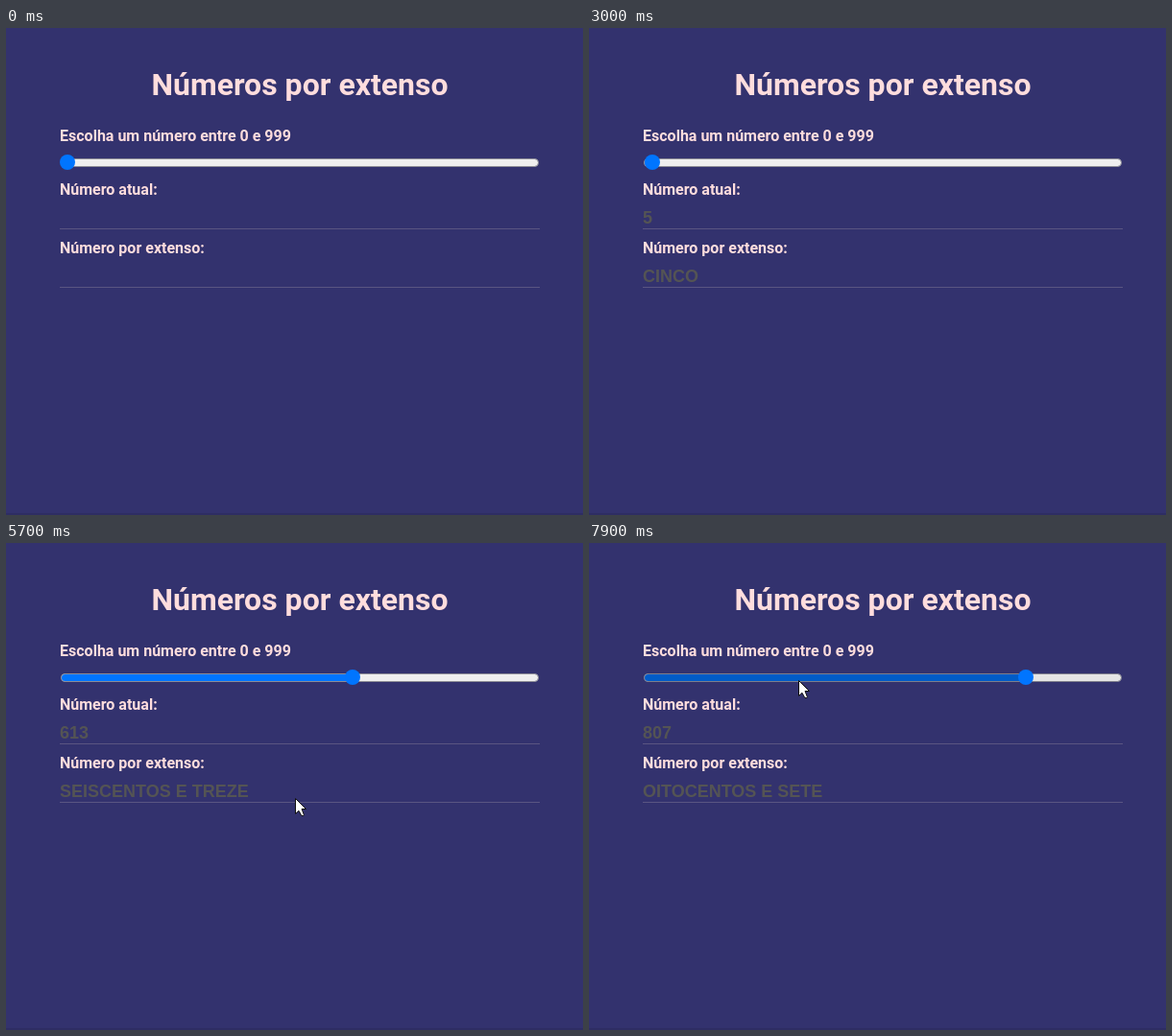
An HTML page that plays this animation: 601x508 px, repeating every 8000 ms.

```html
<!DOCTYPE html>
<html lang="pt">
<head>
<meta charset="utf-8">
<title>Números por extenso</title>
<style>
  html, body { margin: 0; width: 100%; height: 100%; overflow: hidden; background: #33326e; }
  svg { display: block; }
  text { font: bold 16px Roboto, sans-serif; fill: #ffdddd; }
  .title { font-size: 32px; text-anchor: middle; }
  .field { font: bold 18px "Liberation Sans", Arial, sans-serif; fill: #545454; }
  .line { fill: #5a5582; }
  .slider { --accent: #0075ff; --track: #efefef; --edge: #8c8c96; }
  .slider.hover { --accent: #005cc8; --track: #e5e5e5; --edge: #7e7e8c; }
  .slider.press { --accent: #3793ff; --track: #f5f5f5; --edge: #9494a0; }
  #track { fill: var(--track); stroke: var(--edge); }
  #fill { fill: var(--accent); }
  #thumb { fill: #0075ff; }
  #thumb.hover { fill: #005cc8; }
</style>
</head>
<body>
<svg width="601" height="508" viewBox="0 0 601 508">
  <rect width="601" height="508" fill="#33326e"/>
  <rect y="506" width="601" height="2" fill="#2e2d63"/>
  <text class="title" x="306" y="70">Números por extenso</text>
  <text x="56" y="118">Escolha um número entre 0 e 999</text>
  <g class="slider" id="slider">
    <rect id="track" x="57.5" y="136.5" width="497" height="8" rx="4"/>
    <rect id="fill" x="58" y="137" height="7" rx="3.5"/>
    <circle id="thumb" cy="140" r="8"/>
  </g>
  <text x="56" y="174">Número atual:</text>
  <text class="field" id="digits" x="56" y="204"></text>
  <rect class="line" x="56" y="209" width="500" height="1"/>
  <text x="56" y="235">Número por extenso:</text>
  <text class="field" id="words" x="56" y="265"></text>
  <rect class="line" x="56" y="270" width="500" height="1"/>
  <path id="cursor" d="M.5.5V16.5L4 13.3L6.8 18.5H8.8L9.3 17.3L7 11.5H11.5Z"
        fill="#fff" stroke="#111"/>
</svg>
<script>
  const LOOP = 8000, STEP = 100;
  const MIN_X = 64, RANGE = 484, MAX = 999;   // thumb travel and top value
  const KEY_UP = 3000;                        // an arrow key adds one

  // Pointer strokes: quadratic curves from a, bent towards b, resting at c.
  const strokes = [
    { start: 500, end: 1100, a: [50, 39], b: [52, 125], c: [66, 142] },
    { start: 1700, end: 1800, a: [63, 142], b: [63, 142], c: [63, 142] },
    { start: 1900, end: 2100, a: [60, 125], b: [52, 80], c: [36, 16] },
    { start: 4200, end: 4600, a: [520, 166], b: [380, 115], c: [360, 138] },
    { start: 4900, end: 5100, a: [360, 139], b: [361, 139], c: [361, 140] },
    { start: 5400, end: 5900, a: [357, 153], b: [287, 281], c: [295, 296] },
    { start: 6200, end: 6600, a: [318, 276], b: [430, 150], c: [455, 142] },
    { start: 7600, end: 7900, a: [425, 157], b: [330, 180], c: [218, 143] }
  ];
  const presses = [
    { start: 1400, end: 1500 }, { start: 4800, end: 5200 }, { start: 6800, end: 7000 }
  ];

  const ones = ("ZERO UM DOIS TRÊS QUATRO CINCO SEIS SETE OITO NOVE DEZ ONZE DOZE TREZE " +
    "QUATORZE QUINZE DEZESSEIS DEZESSETE DEZOITO DEZENOVE").split(" ");
  const tens = "VINTE TRINTA QUARENTA CINQUENTA SESSENTA SETENTA OITENTA NOVENTA".split(" ");
  const hundreds = ("CENTO DUZENTOS TREZENTOS QUATROCENTOS QUINHENTOS SEISCENTOS " +
    "SETECENTOS OITOCENTOS NOVECENTOS").split(" ");

  function spell(n) {
    if (n < 20) return ones[n];
    if (n === 100) return "CEM";
    const unit = n < 100 ? 10 : 100;
    const head = n < 100 ? tens[Math.floor(n / 10) - 2] : hundreds[Math.floor(n / 100) - 1];
    return n % unit ? `${head} E ${spell(n % unit)}` : head;
  }

  const el = id => document.getElementById(id);
  const latest = (list, t) => list.filter(item => item.start <= t).pop();

  function pointerAt(t) {
    const visible = t >= 500 && t < 2200 || t >= 4200;
    if (!visible) return [-50, -50];
    const { start, end, a, b, c } = latest(strokes, t);
    const u = Math.min(1, (t - start) / (end - start)), v = 1 - u;
    return a.map((p, i) => Math.round(v * v * p + 2 * u * v * b[i] + u * u * c[i]));
  }

  // While pressed, the slider follows the pointer; then it keeps its value.
  function valueAt(t) {
    const press = latest(presses, t);
    if (!press) return 0;
    const [x] = pointerAt(Math.min(t, press.end));
    const step = t >= KEY_UP && press.start < KEY_UP ? 1 : 0;
    return Math.round((x - MIN_X) / RANGE * MAX) + step;
  }

  function render(time) {
    const t = Math.floor(time / STEP) * STEP;
    const value = valueAt(t);
    const thumbX = Math.round(MIN_X + value / MAX * RANGE);
    const [x, y] = pointerAt(t);
    const hover = x >= 56 && x < 556 && y >= 132 && y < 148;
    const press = presses.some(p => t >= p.start && t < p.end);

    el("fill").setAttribute("width", thumbX - 58);
    el("thumb").setAttribute("cx", thumbX);
    el("slider").classList.toggle("hover", hover);
    el("slider").classList.toggle("press", press);
    el("thumb").classList.toggle("hover", hover && Math.abs(x - thumbX) < 8);
    el("digits").textContent = value || "";
    el("words").textContent = value ? spell(value) : "";
    el("cursor").setAttribute("transform", `translate(${x} ${y})`);
  }

  const begin = performance.now();
  function tick() {
    render((performance.now() - begin) % LOOP);
    requestAnimationFrame(tick);
  }
  tick();
</script>
</body>
</html>
```
